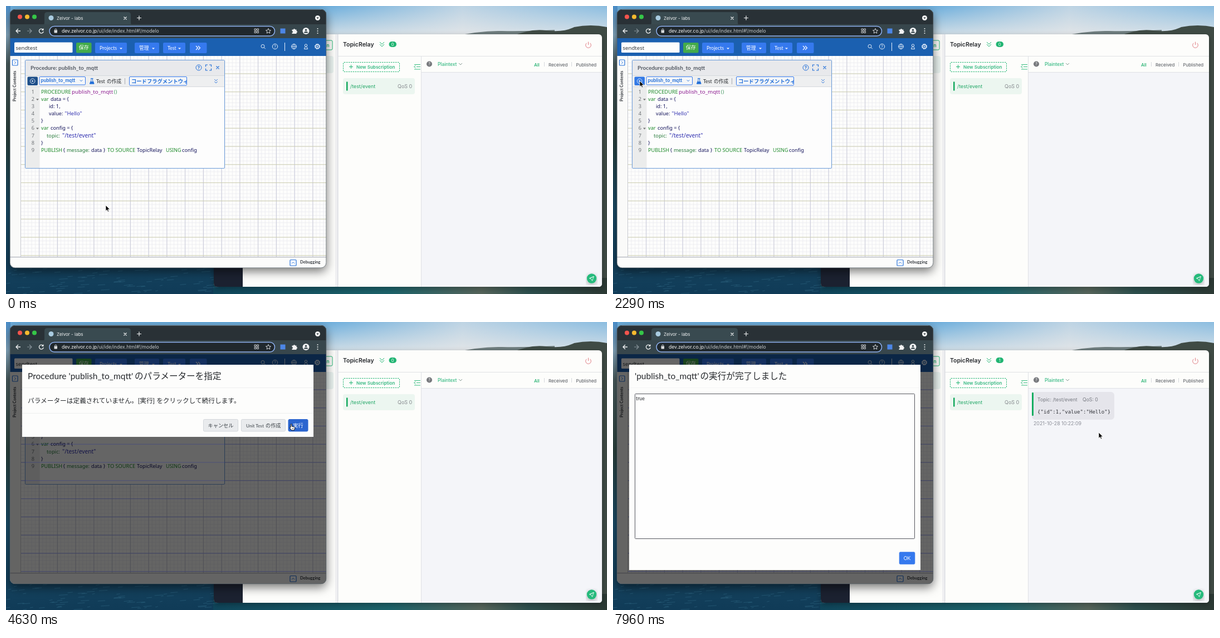
An HTML page that plays this animation: 1079 px wide and 519 px high, repeating every 8 s.

```html
<!DOCTYPE html>
<html lang="ja">
<head>
<meta charset="utf-8">
<style>
html, body { margin: 0; width: 100%; height: 100%; overflow: hidden; background: #17425c }
svg { display: block; width: 100vw; height: 100vh }
text { white-space: pre }
.ui { font-family: Inter, Roboto, sans-serif }
.app { font-family: Lato, "Noto Sans CJK JP", sans-serif }
.code { font-family: "Noto Sans", sans-serif }
.mono { font-family: "DejaVu Sans Mono", monospace }
</style>
</head>
<body>
<svg id="stage" viewBox="0 0 1079 519"></svg>
<script>
const GREEN = '#22b573', BLUE = '#3579ee', LINK = '#2470d8', INK = '#25282c';

const rect = (x, y, w, h, fill, more = '') =>
  `<rect x="${x}" y="${y}" width="${w}" height="${h}" fill="${fill}" ${more}/>`;
const line = (d, stroke, width = 1, more = '') =>
  `<path d="${d}" fill="none" stroke="${stroke}" stroke-width="${width}" ${more}/>`;
const shape = (d, fill, more = '') => `<path d="${d}" fill="${fill}" ${more}/>`;
const dot = (x, y, r, fill, more = '') => `<circle cx="${x}" cy="${y}" r="${r}" fill="${fill}" ${more}/>`;
const ring = (x, y, r, stroke, width = 1) => dot(x, y, r, 'none', `stroke="${stroke}" stroke-width="${width}"`);
const text = (x, y, s, size, fill, cls = 'ui', more = '') =>
  `<text x="${x}" y="${y}" font-size="${size}" fill="${fill}" class="${cls}" ${more}>${s}</text>`;
const bold = 'font-weight="700"', semi = 'font-weight="600"', mid = 'text-anchor="middle"';
const gradient = (id, dir, stops) => `<linearGradient id="${id}" ${dir}>` +
  stops.map(([at, c]) => `<stop offset="${at}" stop-color="${c}"/>`).join('') + '</linearGradient>';
const down = 'x1="0" y1="0" x2="0" y2="1"';
const button = (x, y, w, h, fill, label, size, color = '#fff', more = '') =>
  rect(x, y, w, h, fill, 'rx="2" ' + more) +
  text(x + w / 2, y + h / 2 + size * .36, label, size, color, 'app', mid);
const chevron = (x, y, color, s = 2.5) => line(`M${x - s} ${y - s / 2}l${s} ${s} ${s} ${-s}`, color);
const doubleChevron = (x, y, color, s) => chevron(x, y - 2, color, s) + chevron(x, y + 2, color, s);

function wallpaper() {
  let seed = 7, waves = '';
  const rnd = () => (seed = seed * 16807 % 2147483647) / 2147483647;
  for (let i = 0; i < 90; i++)
    waves += `M${(rnd() * 390).toFixed(1)} ${(470 + rnd() * 49).toFixed(1)}l${(4 + rnd() * 12).toFixed(1)} -1`;
  return `<defs>
    ${gradient('land', down, [[0, '#4a8dc8'], [.1, '#8bb0c8'], [.2, '#4d6062'], [.45, '#2c4440'], [.7, '#1c4f6b'], [1, '#103b57']])}
    ${gradient('sky', down, [[0, '#68acdc'], [.55, '#a9cbe2'], [1, '#dde4e8']])}
    ${gradient('haze', '', [[0, '#e9e8e8" stop-opacity="0'], [.5, '#ece9e8" stop-opacity=".65'], [1, '#dfe5ea" stop-opacity=".3']])}
    ${gradient('shore', '', [[0, '#0f455a'], [.45, '#1c6269'], [.68, '#55645a'], [.8, '#2d4f4d'], [1, '#2c3934']])}
    <filter id="shadow" x="-10%" y="-10%" width="120%" height="125%">
      <feDropShadow dx="0" dy="6" stdDeviation="9" flood-opacity=".55"/></filter>
    <filter id="soft" x="-10%" y="-10%" width="120%" height="125%">
      <feDropShadow dx="0" dy="3" stdDeviation="5" flood-opacity=".3"/></filter>
    <clipPath id="frame"><rect x="7" y="6" width="568" height="466" rx="9"/></clipPath>
    <clipPath id="select"><rect x="222" y="128" width="103" height="15"/></clipPath></defs>` +
    rect(0, 0, 1079, 519, 'url(#land)') + rect(8, 0, 1071, 60, 'url(#sky)') + rect(560, 0, 519, 60, 'url(#haze)') +
    shape('M800 56Q850 44 890 45T985 43V60H800z', '#6f7d7e') +
    shape('M905 56Q940 40 970 44T1020 38Q1050 32 1079 38V519H1060V60z', '#3f4b45') +
    rect(372, 490, 707, 29, 'url(#shore)') + line(waves, '#3b7592', 1, 'opacity=".4"');
}

function client() {
  return `<g filter="url(#soft)">` + rect(373, 51, 697, 455, '#fdfdfb', 'rx="6"') + '</g>' +
    shape('M373 51H425V506H379Q373 506 373 500z', '#1b2130') +
    rect(520, 62, 66, 17, '#fdfdfb', `rx="2" stroke="${GREEN}"`) + text(575.5, 73.5, 'n', 8.3, GREEN, 'ui', semi) +
    rect(500, 90, 88, 31, '#e9f2ef', 'rx="4"') +
    rect(591, 51, 4, 455, '#f0f0f2') + rect(595, 51, 1.5, 455, '#dcdde3') +
    shape('M745 120H1070V500Q1070 506 1064 506H745z', '#f4f5f9') +
    line('M596 90.5H1070M745.5 91V506M745 119.5H1070', '#dfe1e5') +
    text(605, 73, 'TopicRelay', 10.5, INK, 'ui', semi) + doubleChevron(675, 69, GREEN, 4) +
    rect(687.5, 64, 13.5, 10, GREEN, 'rx="5"') + text(694.2, 71.8, '<tspan id="count">0</tspan>', 7.5, '#fff', 'ui', mid) +
    line('M1042.5 66.8A4.8 4.8 0 1 0 1048.5 66.8M1045.5 64.5V70', '#e07c82') +
    rect(605.5, 101.5, 101, 17, 'none', `rx="1.5" stroke="${GREEN}" stroke-dasharray="2.5 1.5"`) +
    line('M616 109.5H623M619.5 106V113', GREEN) + text(629, 112.8, 'New Subscription', 8.1, '#35b982', 'ui', semi) +
    line('M733 105.5H744M737 109.5H744M733 114H744M735.5 107.2L732.5 109.5 735.5 111.8', GREEN, .9) +
    rect(605, 130, 129, 29, '#ecf6f0', 'rx="4"') + rect(611, 136.5, 2.5, 16, '#12a85c') +
    text(618, 148, '/test/event', 8.9, '#21a766') + text(703, 148, 'QoS 0', 9, '#85888d') +
    dot(760, 104.5, 5, '#77797d') + text(760, 107, '?', 7, '#fff', 'ui', mid) +
    text(775, 108, 'Plaintext', 8.3, '#35b982', 'ui', 'font-weight="500"') + chevron(816, 104.5, '#8a9a94', 3) +
    text(948, 108.5, 'All', 8.2, '#21b06e', 'ui', 'font-weight="500"') + line('M966.5 101V109M1015.5 101V109', '#d5d8dc') +
    text(974, 108.5, 'Received', 7.9, '#4b4f56') + text(1023.5, 108.5, 'Published', 7.9, '#4b4f56') +
    `<g id="message">` + rect(752, 126, 148, 50, '#e5e5eb', 'rx="6"') + rect(752, 127, 3, 42, '#16ad62', 'rx="1"') +
    text(762, 143.2, 'Topic: /test/event', 8.7, '#777a82') + text(843, 143.2, 'QoS: 0', 8.7, '#777a82') +
    text(762, 165, '{"id":1,"value":"Hello"}', 9.08, '#303238', 'mono') +
    text(755, 186, '2021-10-28 10:22:09', 8.8, '#8c8f99') + '</g>' +
    `<g filter="url(#soft)">` + dot(1051.5, 491, 8.7, '#27ba7c') + '</g>' +
    line('M1047.5 490.7L1055.3 487.5 1052.5 495.3 1050.8 492.2zL1055.3 487.5', '#fff', .8);
}

function chrome() {
  return rect(7, 6, 568, 28, '#293136') + shape('M66 34Q69 34 69 30V16Q69 11 74 11H219Q224 11 224 16V30Q224 34 227 34z', '#394a50') +
    rect(7, 33, 568, 25, '#37464c') +
    ['#f4544d', '#f6b92e', '#35c648'].map((c, i) => dot(25 + i * 13, 19.5, 4, c)).join('') +
    dot(81, 21.5, 4.5, '#a9cbe0') + text(91, 24.7, 'Zelvor - labs', 8, '#f1f3f4') +
    line('M211.5 19.5l5 5m0 -5l-5 5M235 21.5h8m-4 -4v8', '#f1f3f4', 1.2) +
    dot(559.5, 21.5, 4.5, '#f4f5f5') + shape('M557.3 20.5h4.4l-2.2 2.8z', '#293136') +
    line('M26 45h-8m4 -4l-4 4 4 4', '#f1f3f4', 1.3) + line('M38 45h8m-4 -4l4 4 -4 4', '#87939a', 1.2) +
    line('M66.5 42.5A4 4 0 1 0 67.3 46', '#f1f3f4', 1.3) + shape('M67.5 40v4h-4z', '#f1f3f4') +
    rect(78, 36.5, 404.5, 17.5, '#20282d', 'rx="8.7" stroke="#8eb1f0" stroke-width="1.5"') +
    rect(86.5, 43.5, 5.5, 5, '#d7dadc', 'rx=".7"') + line('M87.7 44v-1.3a1.6 1.6 0 0 1 3.2 0V44', '#d7dadc') +
    text(100, 48.2, 'dev.zelvor.co.jp<tspan fill="#c4c9cc">/ui/ide/index.html#!/modelo</tspan>', 8.55, '#fafafa') +
    line('M446 41h3v3h-3zm4.500 0h3v3h-3zM446 45.500h3v3h-3zm4.500 0h3v3h-3z', '#d7dadc', .9) +
    line('M471 40.500l1.300 3 3.200 .3 -2.400 2.100 .7 3.200 -2.800 -1.700 -2.800 1.700 .7 -3.200 -2.400 -2.100 3.200 -.3z', '#e6e8ea', .9) +
    rect(492.5, 40.5, 9, 9, '#4c86e6') +
    shape('M513.500 42.500h2.500a1.500 1.500 0 0 1 3 0h2.500v2.500a1.500 1.500 0 0 1 0 3v2h-8v-2a1.500 1.500 0 0 0 0 -3z', '#f1f3f4') +
    dot(538.5, 45, 6, '#f1f3f4') + dot(538.5, 43.3, 1.8, '#37464c') + shape('M535 48.500a3.500 2.800 0 0 1 7 0z', '#37464c') +
    [41, 45, 49].map(y => dot(559.5, y, 1, '#f1f3f4')).join('');
}

function toolbar() {
  const icon = '#e6effa';
  const menu = (x, w, label) => button(x, 66, w, 19, BLUE, '', 9) +
    text(x + 8, 78.900, label, 8.8, '#fff', 'app') + shape(`M${x + w - 13} 75.500h5l-2.500 2.500z`, '#fff');
  return rect(7, 58, 568, 32, '#1b60b0') + rect(15, 65.5, 104.5, 18.5, '#fdfdfd', 'rx="1.500"') +
    text(17.5, 78.5, 'sendtest', 9.6, '#343a40', 'code') + button(126, 66, 27.5, 18.5, '#43ab4b', '保存', 9) +
    menu(160, 57, 'Projects') + menu(231, 44, '管理') + menu(282, 40, 'Test') + button(330, 66, 30.5, 19, BLUE, '', 9) +
    line('M341 72l3.500 3.500 -3.500 3.500m4 -7l3.500 3.500 -3.500 3.500', '#fff', 1.2) +
    ring(461, 72.5, 3, icon) + line('M463.300 74.800l2.500 2.500M500.500 66V81', icon) +
    ring(483, 73, 4.7, icon) + text(483, 76, '?', 8, icon, 'ui', mid) +
    ring(517, 73, 4.5, icon) + line('M512.500 73h9M517 68.500q-4 4.500 0 9q4 -4.500 0 -9', icon, .8) +
    ring(538.5, 71, 2.2, icon) + line('M535.500 77.500q0 -4 3 -4t3 4z', icon) +
    ring(559, 73, 3.6, icon, 1.6) + ring(559, 73, 4.6, icon, 1).replace('/>', ' stroke-dasharray="1.800"/>') + ring(559, 73, 1.2, icon);
}

function grid() {
  const rule = (from, to, step, cmd) => {
    let d = '';
    for (let p = from; p < to; p += step) d += cmd(p.toFixed(2));
    return d;
  };
  const col = x => `M${x} 90V452`, row = y => `M27 ${y}H575`;
  const major = 32.75, minor = major / 5;
  rowsPath = rule(122, 452, major, row);
  return rect(27, 90, 548, 362, '#fdfdfc') +
    line(rule(33, 575, minor, col) + rule(95.8, 452, minor, row), '#ebebf0', .8) +
    line(rule(59.7, 575, major, col), '#c9cad9') + line(rowsPath, '#cbccaf');
}
let rowsPath;

function editor() {
  const kw = '#1e8a2a', id = '#15155c', str = '#3030b0', purple = '#8b1a8f';
  // row, x, string, colour, size
  const words = [
    [1, 63, 'PROCEDURE', kw], [1, 118, 'publish_to_mqtt', purple, 9.8], [1, 193.5, '()', '#55a070', 9.8],
    [2, 63, 'var', kw], [2, 80, 'data = {', id], [3, 77, 'id: 1,', id], [4, 77, 'value:', id], [4, 105.5, '"Hello"', str, 9.6],
    [5, 63, '}', id], [6, 63, 'var', kw], [6, 80, 'config = {', id], [7, 73, 'topic:', '#267a3a'], [7, 101, '"/test/event"', str, 10.2],
    [8, 63, '}', id], [9, 63, 'PUBLISH', kw], [9, 102.5, '{', id], [9, 109, 'message:', '#267a3a'], [9, 153, 'data }', id],
    [9, 182, 'TO SOURCE', kw], [9, 235, 'TopicRelay', id], [9, 287, 'USING', kw, 8.8], [9, 316, 'config', id]];
  const rowY = n => 145.1 + n * 13.06;
  let out = rect(34.5, 97.5, 358, 195, '#fdfdfd', 'rx="1.500" stroke="#6b9bd8"') + rect(35, 98, 357, 27, '#e8e9ec') +
    text(44, 114.7, 'Procedure: publish_to_mqtt', 9.9, '#555b64', 'app', bold) +
    ring(346, 111, 5, LINK) + text(346, 114, '?', 8, LINK, 'ui', mid + ' ' + bold) +
    line('M358.500 109.500v-3.500h3.500m3 0h3.500v3.500m0 3v3.500h-3.500m-3 0h-3.500v-3.500M377.500 108.500l5 5m0 -5l-5 5', LINK, 1.2) +
    rect(35, 125, 357, 21, '#eeeff0') + line('M35 125.500H392M35 145.500H392', '#d5d8dc') +
    rect(38.5, 127.5, 18.5, 15.5, '#1d4e89', 'id="play" rx="2"') + ring(47.7, 135.3, 4.3, '#dfe9f7') + shape('M46.500 133.300v4l3 -2z', '#dfe9f7') +
    rect(60, 127.5, 82.5, 14.5, '#f4f6f9', `rx="1.500" stroke="${BLUE}"`) +
    text(62.5, 137.3, 'publish_to_mqtt', 8.6, LINK, 'app', bold) + chevron(135, 134.5, LINK, 2.2) +
    line('M152 130.500h4.500M153 131v3l-2.500 6h7.500l-2.500 -6v-3', LINK) + shape('M151.500 136h5.500l1.500 4.500h-8.500z', LINK) +
    text(162, 139, 'Test', 8.8, INK, 'app') + text(181, 139, 'の作成', 8.7, INK, 'app') + line('M213.500 130V141', '#a8acb2') +
    rect(221.5, 127.5, 103, 15.5, '#f4f6f9', `rx="1.500" stroke="${BLUE}"`) +
    `<g clip-path="url(#select)">${text(225, 138.8, 'コードフラグメントウィ', 9.3, LINK, 'app', bold)}</g>` +
    doubleChevron(377, 135.5, LINK, 2.7) + rect(35, 146, 25.5, 146, '#ebecec');
  for (let n = 1; n < 10; n++) out += text(51, rowY(n), n, 9.2, '#707478', 'code', 'text-anchor="end"');
  for (const n of [2, 6]) out += shape(`M54 ${rowY(n) - 4}h5l-2.500 3z`, '#777');
  return out + words.map(([n, x, s, c, size = 9.2]) => text(x, rowY(n), s, size, c, 'code')).join('');
}

function browser() {
  return `<g filter="url(#shadow)">${rect(7, 6, 568, 466, '#222', 'rx="9"')}</g><g clip-path="url(#frame)">` +
    chrome() + toolbar() + grid() + rect(7, 90, 20, 362, '#fafaf9') + line('M26.500 90V452', '#c8cad0') +
    rect(11.5, 97, 9.5, 10, '#fff', `rx="1" stroke="${LINK}" stroke-width="1.200"`) + line('M15 99.500l2.500 2.500 -2.500 2.500', LINK) +
    text(0, 0, 'Project Contents', 7.4, '#30343a', 'app', bold + ' transform="translate(17.500 172) rotate(-90)"') +
    editor() + rect(7, 452, 568, 20, '#fcfcfb') + line('M7 452.500H575', '#b9bcc4', 1.5) +
    rect(510, 457.5, 11, 10.5, '#fff', `rx="1" stroke="${LINK}" stroke-width="1.200"`) + line('M513 464l2.500 -2.500 2.500 2.500', LINK) +
    text(528, 464.4, 'Debugging', 7.6, '#383c42', 'app', bold) +
    `<g id="shade">${rect(7, 58, 568, 414, '#000', 'opacity=".6"')}${line(rowsPath, '#2a3490', 1, 'opacity=".45"')}</g></g>` +
    line('M16 6.500H566', '#77858c', .8) + rect(7.3, 6.3, 567.4, 465.4, 'none', 'rx="9" stroke="#59646a" stroke-width=".7"');
}

function dialogs() {
  const title = (s, x, jp) => text(39, 102.5, s, 15.5, INK, 'app') + text(x, 102.5, jp, 15.6, INK, 'app');
  const grey = 'stroke="#d3d7db"';
  return '<g id="ask">' + rect(29, 77, 523, 130, '#fdfdfc') + line('M29 118.500H552M29 164.500H552', '#eeefef') +
    title("Procedure 'publish_to_mqtt'", 231, 'のパラメーターを指定') +
    text(39, 146.2, 'パラメーターは定義されていません。[実行] をクリックして続行します。', 11.7, INK, 'app') +
    button(354.5, 175.5, 62, 21.5, '#e9ebed', 'キャンセル', 9.2, '#3c4248', grey) +
    button(422.5, 175.5, 79, 21.5, '#e9ebed', '', 9, '#3c4248', grey) +
    text(431, 189.5, 'Unit Test', 8.2, '#3c4248', 'app') + text(466, 189.5, 'の作成', 9.2, '#3c4248', 'app') +
    button(507, 175.5, 35, 21.5, BLUE, '実行', 9.2, '#fff', 'id="run" stroke="#2d67cf"') + '</g>' +
    '<g id="done">' + rect(29, 77, 523, 370, '#fdfdfc') + line('M29 118.500H552', '#f5f5f5') +
    title("'publish_to_mqtt'", 156.5, 'の実行が完了しました') +
    rect(39.5, 129.5, 502, 261, '#fefefe', 'rx="1" stroke="#55565e"') + text(41, 141, 'true', 8.8, INK, 'app') +
    button(514, 414.5, 28, 22, BLUE, 'OK', 8.6, '#fff', 'stroke="#4a83e8" stroke-width=".6"') + '</g>';
}

const pointer = '<g id="arrow">' + shape('M0 0V10.500L2.400 8.300 4 12 5.700 11.300 4.200 7.700H7.500z', '#000', 'stroke="#fff" stroke-width=".8"') + '</g>' +
  '<g id="beam">' + line('M-2.500 -5q2.500 0 2.500 1.500V3.500q0 1.500 -2.500 1.500M2.500 -5q-2.500 0 -2.500 1.500M0 3.500q0 1.500 2.500 1.500M-1.200 .8h2.400', '#111') + '</g>' +
  '<g id="hand">' + shape('M-1 0.500Q0 -1 1 .5V4L5.500 5.200Q7 6 6.500 8L5.500 11H.5L-2.800 6.500Q-2.500 5 -1 6z', '#fff', 'stroke="#000" stroke-width=".9"') +
  line('M2.300 7V9M4 7V9', '#000', .6) + '</g>';

const stage = document.getElementById('stage');
stage.innerHTML = wallpaper() + client() + browser() + dialogs() + `<g id="cursor">${pointer}</g>`;
const part = {};
stage.querySelectorAll('[id]').forEach(e => part[e.id] = e);

// time, x, y of the pointer
const path = [[0, 179, 359], [650, 179, 359], [1400, 54, 186], [1550, 54, 186], [2050, 48, 135], [3250, 48, 135],
  [3400, 48.5, 136], [3650, 48.5, 136], [4450, 512, 184], [6500, 512, 184], [7300, 872, 199], [8000, 872, 199]];
const ASK = 3215, RUN = 4830, REPLY = 5060, DONE = 5150;

const clamp = v => Math.min(1, Math.max(0, v));
const inside = (x, y, l, t, r, b) => x >= l && x <= r && y >= t && y <= b;
const show = (e, on) => e.setAttribute('visibility', on ? 'visible' : 'hidden');

function pointerAt(t) {
  const i = Math.max(1, path.findIndex(p => p[0] > t));
  const [t0, x0, y0] = path[i - 1], [t1, x1, y1] = path[i];
  const k = clamp((t - t0) / (t1 - t0)), e = k * k * (3 - 2 * k);
  return [x0 + (x1 - x0) * e, y0 + (y1 - y0) * e];
}

function slide(e, t, start, end) {
  const enter = clamp((t - start) / 300), leave = clamp((t - end) / 300);
  const lift = 50 * ((1 - enter) ** 2.3 + leave ** 2);
  show(e, t > start && leave < 1);
  e.setAttribute('opacity', clamp((t - start) / 150) * (1 - clamp((t - end) / 150)));
  e.setAttribute('transform', `translate(0 ${-lift.toFixed(2)})`);
}

function draw(t) {
  const [x, y] = pointerAt(t), asking = t > ASK && t < RUN + 150, finished = t > DONE;
  slide(part.ask, t, ASK, RUN);
  slide(part.done, t, DONE, 1e5);
  part.shade.setAttribute('opacity', clamp((t - ASK) / 150));
  show(part.message, t > REPLY);
  part.count.textContent = t > REPLY ? 1 : 0;

  const overRun = asking && inside(x, y, 507, 175, 542, 197);
  const overText = finished ? inside(x, y, 40, 130, 542, 391) : t < ASK && inside(x, y, 61, 146, 392, 292);
  part.play.setAttribute('fill', inside(x, y, 38, 127, 57, 143) ? '#3279e6' : '#1d4e89');
  part.run.setAttribute('fill', overRun ? '#2b65cf' : BLUE);
  show(part.hand, overRun);
  show(part.beam, overText);
  show(part.arrow, !overRun && !overText);
  part.cursor.setAttribute('transform', `translate(${x.toFixed(2)} ${y.toFixed(2)})`);
}

const begin = performance.now();
function tick() {
  draw((performance.now() - begin) % 8000);
  requestAnimationFrame(tick);
}
tick();
</script>
</body>
</html>
```
